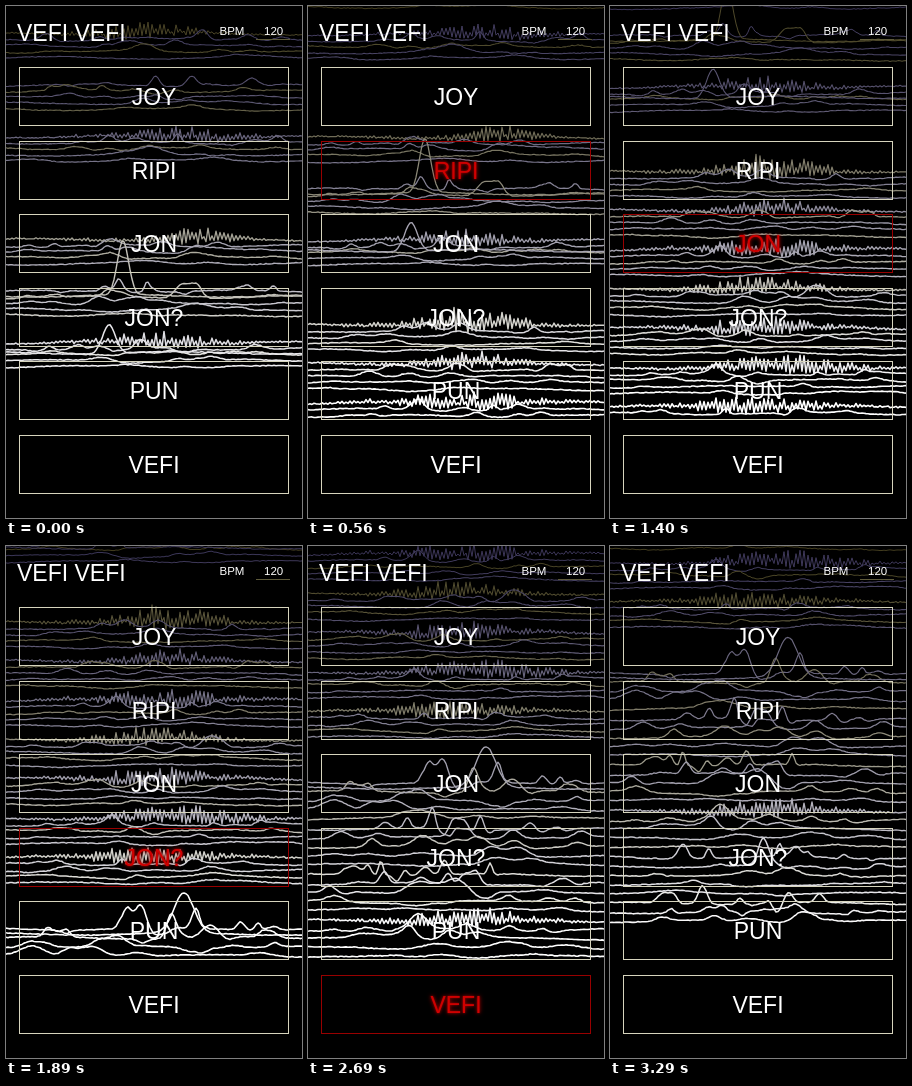
Recreate the animation shown at these times as an HTML page with a canvas. Size 296 by 512 pixels, loop 3.32 s.

```html
<!DOCTYPE html>
<html lang="en">
<head>
<meta charset="utf-8">
<title>Wave pads</title>
<style>
html, body { margin: 0; width: 100%; height: 100%; overflow: hidden; background: #000; }
#stage {
  position: absolute; left: 0; top: 0; width: 296px; height: 512px; overflow: hidden;
  background: #000; color: #fff; font: 23px/1 "Liberation Sans", Arial, sans-serif;
}
canvas { position: absolute; left: 0; top: 0; }
.label { position: absolute; white-space: pre; }
.small { font-size: 11.5px; top: 20px; }
.rule { position: absolute; left: 250px; top: 33px; width: 34px; height: 1px; background: #5e5a3a; }
.pad {
  position: absolute; left: 13px; width: 270px; height: 59px; box-sizing: border-box;
  border: 1px solid #d6d4bd; text-align: center; line-height: 58px;
}
.pad.on { color: #d00000; border-color: #980000; text-shadow: 0 0 4px #b00000, 0 0 2px #800000; }
</style>
</head>
<body>
<div id="stage">
  <canvas id="waves" width="296" height="512"></canvas>
  <div class="label" style="left:11px;top:16px">VEFI VEFI</div>
  <div class="label small" style="left:213.5px">BPM</div>
  <div class="label small" style="left:258px">120</div>
  <div class="rule"></div>
</div>
<script>
const LOOP = 3320, WIDTH = 296, HEIGHT = 512;
const SPEED = 0.1825;            // px per ms, upwards
const BIRTH_Y = 411, LAST_Y = 980;
const HOLD = 240;                // ms a pad stays lit
const stage = document.getElementById('stage');
const ctx = document.getElementById('waves').getContext('2d');

const taps = { JOY: 40, RIPI: 480, JON: 1230, 'JON?': 1740, PUN: 2200, VEFI: 2600 };
const pads = Object.entries(taps).map(([text, on], i) => {
  const el = document.createElement('div');
  el.className = 'pad';
  el.textContent = text;
  el.style.top = Math.round(61 + i * 73.6) + 'px';
  stage.append(el);
  return { el, on };
});

let seed = 1979;
function rand(from = 0, to = 1) {
  seed = (seed * 16807) % 2147483647;
  return from + (to - from) * seed / 2147483647;
}
const bell = (x, mid, spread) => Math.exp(-(((x - mid) / spread) ** 2));
const lines = [];

// A fine noisy trace, tallest around a random centre.
function noise(spike) {
  const mid = rand(130, 195), spread = rand(35, 75);
  let side = 1;
  return x => {
    side = -side;
    const env = 0.3 * bell(x, 150, 110) + 0.7 * bell(x, mid, spread);
    return spike * env * (side > 0 ? rand(0.1, 1) : -rand(0, 0.5));
  };
}

// A band of bumps: narrow and many for low bands, wide and few for high ones.
function swell(band, hump) {
  const bumps = Array.from({ length: 15 - 2 * band }, () => {
    const x = rand(20, 276);
    const height = hump * rand(-0.4, 1) * (0.35 + 0.65 * bell(x, 150, 70));
    return [x, height, rand(0.6, 1.5) * (5 + 2.5 * band)];
  });
  return x => bumps.reduce((sum, [mid, height, width]) => sum + height * bell(x, mid, width), 0);
}

function addLine(y, wave) {
  const path = new Path2D(), phase = rand(0, 6.28);
  for (let x = 0; x <= WIDTH; x += 2)
    path.lineTo(x, -wave(x) - Math.sin(x / 31 + phase) * 1.2 - rand(-0.4, 0.4));
  lines.push({ y, path });
}

// Each sound leaves five lines, one per band.
function addSound(y, gap, spike, hump) {
  for (let band = 0; band < 5 && y + band * gap < LAST_Y; band++) {
    const noisy = spike && !band;
    addLine(y + band * gap, noisy ? noise(spike) : swell(band, hump * (1 - band / 6)));
  }
}

for (let i = 0; i < 7; i++)
  if (i !== 3) addSound(28 + i * 51.5, 6, i % 2 ? 0 : 12, 12);
for (let i = 0; i < 7; i++) addSound(421 + i * 39.3, 6.4, i ? 13 : 20, 11);
for (let i = 0; i < 6; i++) addSound(728 + i * 46, 9, i === 3 ? 13 : 0, i < 3 ? 26 : 14);

// Tall single crests: base y, x, height, spread.
for (const [y, mid, height, spread] of [[290, 117, 54, 8], [347, 103, 29, 9], [733, 178, 40, 14]])
  addLine(y, x => height * bell(x, mid, spread));

function shade(y, i) {
  const k = Math.min(1, Math.max(0, y / 385));
  const light = 62 + 193 * k ** 1.35, tint = 30 * (1 - k);
  return i % 3
    ? `rgb(${light},${light - tint * 0.2},${light + tint})`
    : `rgb(${light + tint * 0.3},${light + tint * 0.1},${light - tint})`;
}

function draw(t) {
  ctx.clearRect(0, 0, WIDTH, HEIGHT);
  ctx.lineJoin = 'round';
  lines.forEach(({ y, path }, i) => {
    const at = y - SPEED * t;
    if (at > BIRTH_Y || at < -40) return;
    ctx.save();
    ctx.translate(0, at);
    ctx.strokeStyle = shade(at, i);
    ctx.lineWidth = 0.95 + 0.65 * Math.max(0, at / 400);
    ctx.stroke(path);
    ctx.restore();
  });
  for (const { el, on } of pads) el.classList.toggle('on', t >= on && t < on + HOLD);
}

const began = performance.now();
function tick() {
  draw((performance.now() - began) % LOOP);
  requestAnimationFrame(tick);
}
draw(0);
requestAnimationFrame(tick);
</script>
</body>
</html>
```
